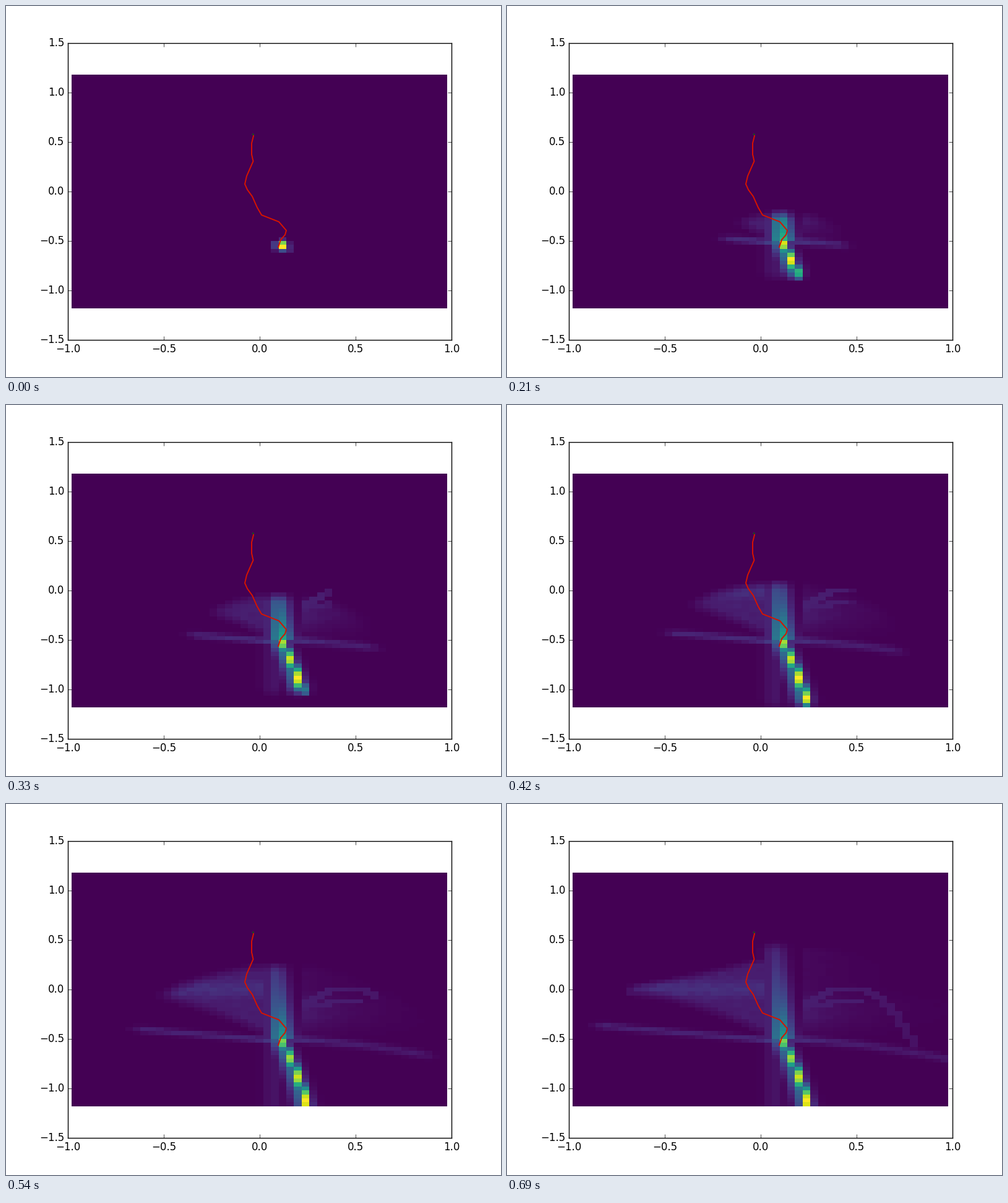
Animation of 800 by 600 pixels, one loop 0.72 s. Source, as a matplotlib script:

```python
import numpy as np
import matplotlib.pyplot as plt
from matplotlib.animation import FuncAnimation

FRAMES, INTERVAL = 24, 30
COLS, ROWS, STEP = 49, 59, 0.04
START = (0.12, -0.55)

plt.rcParams.update({
    "font.family": "DejaVu Sans", "font.size": 12,
    "text.hinting": "force_autohint", "text.hinting_factor": 8,
    "text.kerning_factor": 6,
    "axes.linewidth": 1.0, "ytick.alignment": "center",
})

xe = -0.98 + STEP * np.arange(COLS + 1)
ye = -1.18 + STEP * np.arange(ROWS + 1)
X, Y = np.meshgrid(xe[:-1] + STEP / 2, ye[:-1] + STEP / 2)
PX, PY = 410 + 310 * X, 300 - 160 * Y   # cell centres on the stage
DIST = np.hypot(X - START[0], Y - START[1])


def bell(d, width):
    return np.exp(-(d / width) ** 2)


def rising_beam():
    h = (380 - PY) / 160
    column = 0.57 * np.exp(-1.9 * h) * bell(PX - 446 + 14 * h, 17)
    return column * (PY < 380)


def falling_beam():
    d = PY - 383
    off = PX - (446.5 + 0.51 * d - 0.0012 * d ** 2)
    core = (0.8 + 0.2 * d / 100) * bell(off, 7)
    skirt = 0.33 * bell(off + 5, 15)
    haze = 0.05 * bell(PX - 432, 16)
    return np.maximum.reduce([core, skirt, haze]) * (PY > 380)


def side_rays():
    near = 0.1 * np.exp(-np.abs(PX - 447) / 50)
    left = (PX < 440) * (near + 0.09) * bell(PY - 357 - 0.085 * (PX - 131), 5)
    d = PX - 490
    sag = 382 + 0.07 * d + 0.0003 * d ** 2
    right = (PX > 455) * (near + 0.065) * bell(PY - sag, 6)
    return np.maximum(left, right)


def left_wedge():
    s = np.clip((PX - 190) / 226, 0, 1)
    top, low = 297 - 45 * s ** 1.2, 303 + 65 * s ** 1.6
    inside = (np.clip((PY - top) / 12 + 0.5, 0, 1)
              * np.clip((low - PY) / 20 + 0.5, 0, 1))
    body = inside * (0.075 + 0.055 * bell(PY - 299, 13))
    return body * (PX > 187) * (PX < 416)


def right_haze():
    d = np.maximum(PX - 472, 0)
    dome = 0.075 * np.exp(-d / 80) * bell(PY - 335, 32)
    upper = 0.025 * np.exp(-d / 70) * (PY > 235) * (PY < 320)
    return np.maximum(dome, upper) * (PX > 478)


def trace(px, py, value):
    """Mark the cells that a curve on the stage runs through."""
    field = np.zeros((ROWS, COLS))
    col = ((px - 106.2) / 12.4).astype(int)
    row = ((488.8 - py) / 6.4).astype(int)
    field[row, col] = value
    return field


def arches():
    x = np.linspace(485, 658, 600)
    outer = trace(x, 300.5 + 92 * (np.abs(x - 552) / 106) ** 2.7,
                  np.linspace(0.08, 0.045, 600))
    x = np.linspace(500, 574, 300)
    return np.maximum(outer, trace(x, 319 + 15 * ((x - 547) / 60) ** 2, 0.075))


rng = np.random.default_rng(4)
soft = np.maximum.reduce([side_rays(), left_wedge(), right_haze()])
soft *= rng.uniform(0.9, 1.1, soft.shape)
falling = falling_beam()
density = np.maximum.reduce([rising_beam(), falling, soft])
late = (Y < -0.58) & (X > 0.1)
arcs = arches()


def heat(t):
    """Density uncovered by a wave that spreads from the start point."""
    reach = 0.06 + 0.0418 * t - 0.035 * bell(t - 4, 2.5) * late
    shown = density * np.clip((reach - DIST + 0.02) / 0.1, 0, 1)
    front = 478 + 11.6 * (t - 7)
    arc = arcs * np.clip((front - PX) / 12.4 + 0.5, 0, 1)
    field = np.maximum(shown, arc)
    return field / field.max()


fig = plt.figure(figsize=(8, 6), dpi=100, facecolor="white")
ax = fig.add_axes([0.125, 0.1, 0.775, 0.8])
ax.set(xlim=(-1, 1), ylim=(-1.5, 1.5),
       xticks=np.arange(-1, 1.1, 0.5), yticks=np.arange(-1.5, 1.6, 0.5))
ax.xaxis.set_major_formatter("{x:.1f}")
ax.yaxis.set_major_formatter("{x:.1f}")
ax.tick_params(direction="in", length=4, width=0.5, pad=4, top=True, right=True)

# A small shift puts the column edges on whole pixels.
mesh = ax.pcolormesh(xe - 0.4 / 310, ye, heat(0), cmap="viridis", vmin=0, vmax=1,
                     antialiased=False, linewidth=0)

path = np.array([
    (440, 390), (444, 378), (451, 370), (453, 363), (441, 349), (413, 338),
    (406, 326), (398, 308), (390, 297), (386, 288), (389, 275), (399.5, 251),
    (397, 240), (397, 222), (400, 210), (399, 207)])
lx, ly = (path[:, 0] - 410) / 310, (300 - path[:, 1]) / 160
ax.plot(lx, ly, color="green", lw=1)
ax.plot(lx[:-1], ly[:-1], color="red", lw=1.4, alpha=0.85)


def update(t):
    mesh.set_array(heat(t))
    return mesh,


anim = FuncAnimation(fig, update, frames=FRAMES, interval=INTERVAL,
                     repeat=True, repeat_delay=0, blit=False)
plt.show()
```
